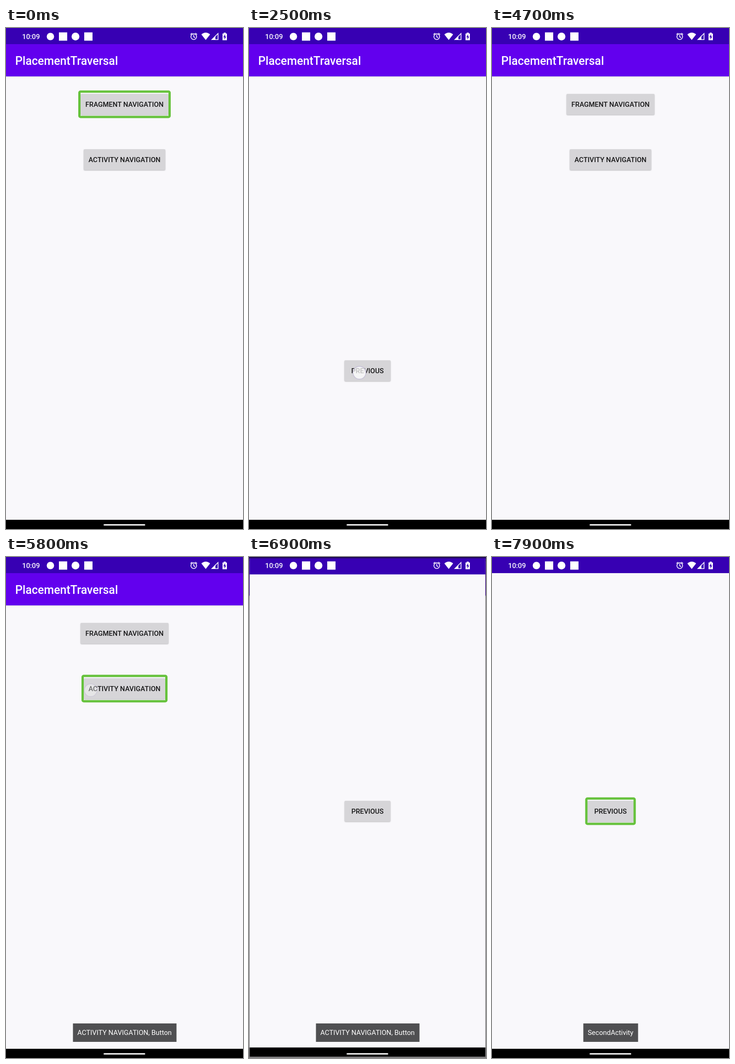
These frames come from a looping animation (515 px wide and 1087 px high, 8000 ms). An HTML page:

```html
<!DOCTYPE html>
<html lang="en">
<head>
<meta charset="utf-8">
<title>Navigation demo</title>
<style>
  html, body { margin: 0; width: 100%; height: 100%; overflow: hidden; background: #000; }
  #stage { position: relative; width: 515px; height: 1087px; overflow: hidden; font: 15px Roboto, sans-serif; }
  svg { position: absolute; inset: 0; display: block; }
  .label { font-weight: 500; fill: #161617; text-anchor: middle; }
  .button rect { fill: #d6d5d8; filter: drop-shadow(0 1px 1px #0004); }
  .title { font-weight: 500; font-size: 25px; fill: #fff; }
  .clock { font-weight: 500; font-size: 15.2px; fill: #fff; }
  #toast {
    position: absolute; top: 1012px; left: 50%; transform: translateX(-50%);
    height: 40px; line-height: 41px; padding: 0 10px; white-space: nowrap;
    background: #505052; color: #fff;
  }
</style>
</head>
<body>
<div id="stage">
  <svg width="515" height="1087" viewBox="0 0 515 1087">
    <defs>
      <linearGradient id="shade" x2="0" y2="1">
        <stop stop-color="#e4e2e8"/><stop offset="1" stop-color="#f9f8fb"/>
      </linearGradient>
      <g id="window">
        <rect width="515" height="1087" fill="#f9f8fb"/>
        <rect width="515" height="35" fill="#3700b3"/>
        <rect y="1067" width="515" height="20"/>
      </g>
    </defs>
    <g id="main">
      <use href="#window"/>
      <rect y="35" width="515" height="70" fill="#6200ee"/>
      <rect y="105" width="515" height="4" fill="url(#shade)"/>
      <text class="title" x="20" y="79.5">PlacementTraversal</text>
      <g id="menu"></g>
      <g id="detail"></g>
    </g>
    <rect id="dim" width="515" height="1087"/>
    <g id="second"><use href="#window"/></g>
    <rect id="ring" height="55" rx="2.5" fill="none" stroke="#66c23c" stroke-width="5"/>
    <rect x="212" y="1076.5" width="90.5" height="3" rx="1.5" fill="#fff"/>
    <g fill="#fff">
      <text class="clock" x="35" y="24">10:09</text>
      <circle cx="96.5" cy="18.5" r="8"/>
      <rect x="115" y="9.5" width="18" height="18"/>
      <circle cx="151" cy="18.5" r="8.5"/>
      <rect x="170" y="9.5" width="18" height="18"/>
      <g fill="none" stroke="#fff" stroke-width="1.6">
        <circle cx="408" cy="18.8" r="6.2"/>
        <path d="M408 14.8V19.2L411 21M400.8 14.2L404.6 11M415.2 14.2L411.4 11"/>
      </g>
      <path d="M434 26L424.5 14Q434 6 443.5 14Z"/>
      <path d="M447.5 25.2H460.7V12Z" fill="none" stroke="#fff" stroke-width="1.6"/>
      <path d="M446 26H455V17Z"/>
      <path d="M470.5 12H473V10H477.5V12H480V26.5H470.5Z"/>
      <path d="M476.2 13.5L472.3 20H474.7V25L478.4 18.4H476.2Z" fill="#3700b3"/>
    </g>
  </svg>
  <div id="toast"></div>
  <svg width="515" height="1087">
    <circle id="touch" r="14" fill="#fffb" stroke="#c9c4d8" stroke-width="1.8"/>
  </svg>
</div>
<script>
const LOOP = 8000, STEP = 100, CX = 257.5, CY = 543.5;
const el = id => document.getElementById(id);

const buttons = {
  fragment: { page: 'menu', text: 'FRAGMENT NAVIGATION', y: 165.5, width: 191 },
  activity: { page: 'menu', text: 'ACTIVITY NAVIGATION', y: 285.5, width: 177 },
  back: { page: 'detail', text: 'PREVIOUS', y: 743.5, width: 100 },
  finish: { page: 'second', text: 'PREVIOUS', y: 551.5, width: 100 },
};
for (const { page, text, y, width } of Object.values(buttons)) {
  el(page).insertAdjacentHTML('beforeend', `<g class="button">
    <rect x="${CX - width / 2}" y="${y - 22.5}" width="${width}" height="45" rx="2"/>
    <text class="label" x="${CX}" y="${y + 5.5}">${text}</text></g>`);
}

// Each span is active while from <= t < to.
const focuses = [
  { from: 0, to: 700, button: buttons.fragment },
  { from: 2700, to: 3800, button: buttons.back },
  { from: 5400, to: 6700, button: buttons.activity },
  { from: 7500, to: LOOP, button: buttons.finish },
];
const toasts = [
  { from: 2700, to: 4700, text: 'PREVIOUS, Button' },
  { from: 5400, to: 7300, text: 'ACTIVITY NAVIGATION, Button' },
  { from: 7300, to: LOOP, text: 'SecondActivity' },
];
const touches = [
  { from: 500, to: 900, x: 150, y: 628 },
  { from: 2500, to: 2900, x: 240, y: 748 },
  { from: 3600, to: 4000, x: 148.5, y: 627.5 },
  { from: 5200, to: 5900, x: 184, y: 289 },
  { from: 6400, to: 6800, x: 170, y: 629 },
];
const active = (spans, t) => spans.find(s => t >= s.from && t < s.to);
const clamp = v => Math.min(1, Math.max(0, v));
const show = (node, on) => { node.style.display = on ? '' : 'none'; };

const bezier = (a, b, c, d, u) => {
  const v = 1 - u;
  return a * v ** 3 + 3 * b * u * v * v + 3 * c * u * u * v + d * u ** 3;
};

// Fast start, very slow end: two cubic segments meeting at (1/6, 0.4).
function emphasized(x) {
  const [xs, ys] = x < 1 / 6
    ? [[0, .05, .1333, 1 / 6], [0, 0, .06, .4]]
    : [[1 / 6, .2083, .25, 1], [.4, .82, 1, 1]];
  let low = 0, high = 1;
  for (let i = 0; i < 24; i++) {
    const mid = (low + high) / 2;
    if (bezier(...xs, mid) < x) low = mid; else high = mid;
  }
  return bezier(...ys, low);
}

function scale(node, s) {
  node.setAttribute('transform', `translate(${CX} ${CY}) scale(${s}) translate(${-CX} ${-CY})`);
}

function render(t) {
  const inDetail = t >= 700 && t < 3800;
  show(el('menu'), !inDetail);
  show(el('detail'), inDetail);

  const opening = emphasized(clamp((t - 6643) / 464));
  const reveal = clamp((t - 6700) / 50);
  scale(el('main'), 1 + .05 * opening);
  scale(el('second'), .85 + .15 * opening);
  el('second').style.opacity = reveal;
  el('dim').style.opacity = reveal / 2;

  const focus = active(focuses, t);
  show(el('ring'), focus);
  if (focus) {
    const { y, width } = focus.button;
    el('ring').setAttribute('x', CX - width / 2 - 2.5);
    el('ring').setAttribute('y', y - 27.5);
    el('ring').setAttribute('width', width + 5);
  }

  const toast = active(toasts, t);
  show(el('toast'), toast);
  if (toast) el('toast').textContent = toast.text;

  const touch = active(touches, t);
  show(el('touch'), touch);
  if (touch) {
    el('touch').setAttribute('cx', touch.x);
    el('touch').setAttribute('cy', touch.y);
    el('touch').style.opacity = clamp((touch.to - t) / 200);
  }
}

function tick() {
  const t = performance.now() % LOOP;
  render(Math.floor(t / STEP) * STEP);
  requestAnimationFrame(tick);
}
tick();
</script>
</body>
</html>
```
